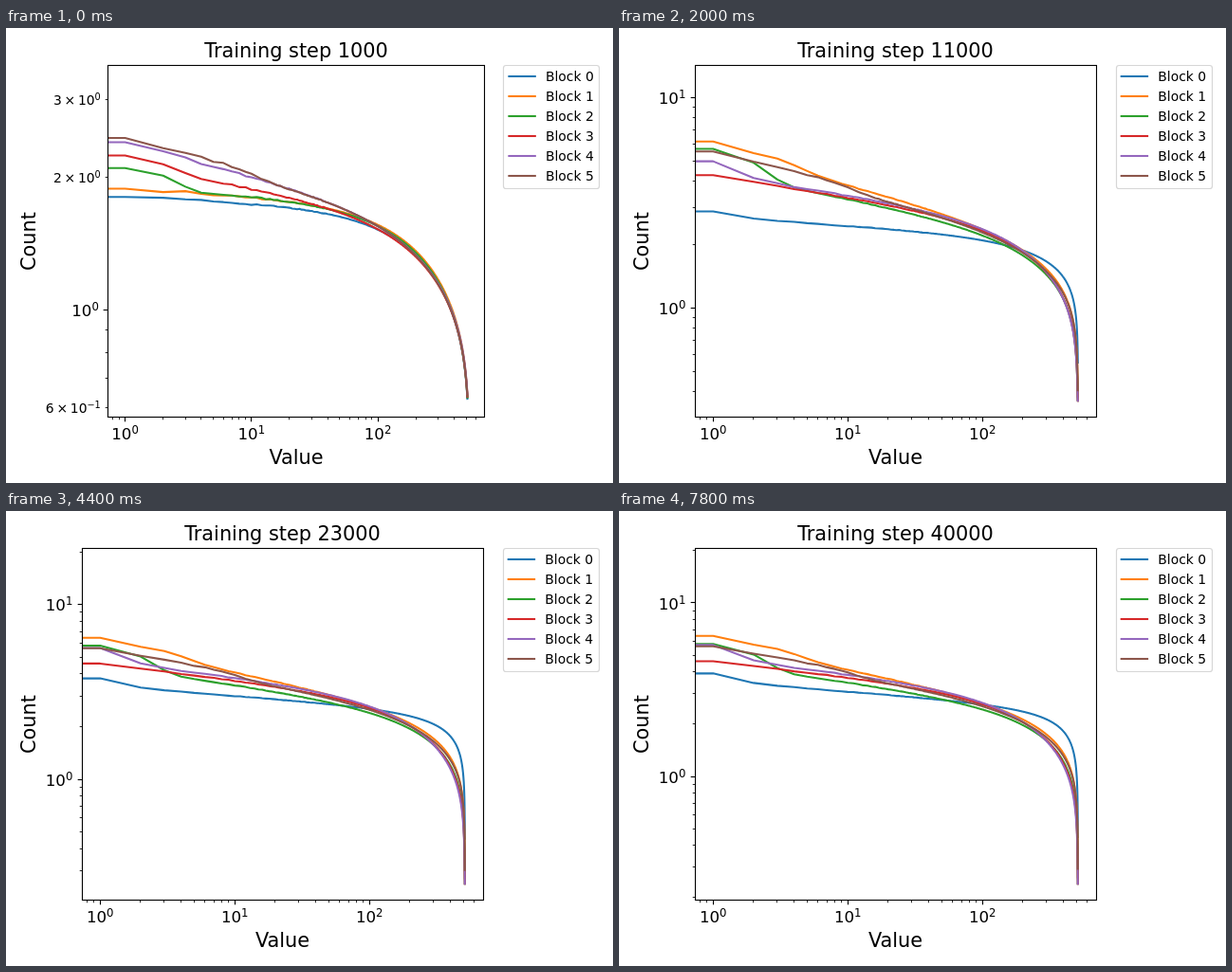
These frames come from a looping animation (640x480 px, 8 s). An HTML page:

```html
<!DOCTYPE html>
<html lang="en">
<head>
<meta charset="utf-8">
<title>Training curves</title>
<style>
html, body { margin: 0; width: 100%; height: 100%; overflow: hidden; background: #fff; }
svg { display: block; width: 640px; height: 480px; font-family: "DejaVu Sans", sans-serif; }
.curve { fill: none; stroke-width: 2.08; stroke-linejoin: round; stroke-linecap: square; }
.major, .frame { fill: none; stroke: #000; stroke-width: 1.11; }
.minor { stroke: #000; stroke-width: .83; }
</style>
</head>
<body>
<svg id="chart" viewBox="0 0 640 480"></svg>
<script>
const STEP_MS = 200, STEPS = 40, COUNT = 511;
const TOP = 39.5, BOTTOM = 410, HEIGHT = BOTTOM - TOP;

// Each curve in log10: level at 1, level at 100, linear fall, edge exponent,
// lift of the largest values. `reach` is how many values are lifted;
// `settle` is the time constant of the head in steps.
const BLOCKS = [
  { color: '#1f77b4', from: [.256, .232, .18, .17, 0], to: [.55, .43, -.04, .25, .05], reach: 1.4, settle: 10.6, slow: true },
  { color: '#ff7f0e', from: [.275, .243, .18, .17, 0], to: [.775, .46, .06, .28, .035], reach: 5, settle: 3 },
  { color: '#2ca02c', from: [.28, .24, .18, .17, .042], to: [.655, .435, .1, .31, .11], reach: 2.4, settle: 2.5 },
  { color: '#d62728', from: [.33, .225, .14, .17, .02], to: [.665, .485, .21, .29, 0], reach: 2.6, settle: 4.5 },
  { color: '#9467bd', from: [.38, .228, .12, .17, 0], to: [.688, .498, .23, .3, .08], reach: 1.4, settle: 5.5 },
  { color: '#8c564b', from: [.375, .23, .13, .17, .015], to: [.72, .45, .11, .25, .03], reach: 11, settle: 2.5 }
];
const BULK_SETTLE = 6.5;

const approach = (a, b, t, tau, power = 1) => b + (a - b) * Math.exp(-((t / tau) ** power));
const noise = n => { const v = Math.sin(n * 127.1) * 43758.5453; return v - Math.floor(v) - .5; };

// Monotone cubic interpolation through a few points.
function spline(xs, ys) {
  const n = xs.length;
  const d = xs.slice(1).map((x, i) => (ys[i + 1] - ys[i]) / (x - xs[i]));
  const m = xs.map((_, i) => {
    const a = d[i - 1], b = d[i];
    return i && i < n - 1 && a * b > 0 ? 2 * a * b / (a + b) : 0;
  });
  m[0] = 1.5 * d[0] - .5 * m[1];
  m[n - 1] = 1.5 * d[n - 2] - .5 * m[n - 2];
  return x => {
    let i = 0;
    while (i < n - 2 && x > xs[i + 1]) i++;
    const h = xs[i + 1] - xs[i], u = (x - xs[i]) / h, v = 1 - u;
    return v * v * ((1 + 2 * u) * ys[i] + u * h * m[i]) +
           u * u * ((3 - 2 * u) * ys[i + 1] - v * h * m[i + 1]);
  };
}

// Vertical limits as log10 values.
const LIMIT_STEPS = [1, 7, 15, 23, 29, 40];
const lowAt = spline(LIMIT_STEPS, [-.243, -.449, -.571, -.688, -.717, -.71]);
const highAt = spline(LIMIT_STEPS, [.554, 1.015, 1.237, 1.32, 1.33, 1.314]);

function curveAt(block, index, step) {
  const t = step - 1;
  const [head, bulk, fall, edge, lift] = block.from.map((a, i) => {
    const tau = block.slow || i === 0 || i === 4 ? block.settle : BULK_SETTLE;
    return approach(a, block.to[i], t, tau, block.slow ? 1.5 : 1);
  });
  const end = COUNT + approach(19, .4, t, 3.9);
  return x => {
    const lx = Math.log10(x);
    const rough = x > 1 ? .01 * noise(x + 600 * index) / Math.sqrt(x) : 0;
    return head + (bulk - head) * lx / 2 - fall * x / COUNT + edge * Math.log10(1 - x / end) +
           lift / (1 + (x / block.reach) ** 6) + rough * (x < 40);
  };
}

const snap = v => Math.floor(v) + .5;
const text = (x, y, size, anchor, body, more = '') =>
  `<text x="${x}" y="${y}" font-size="${size}" text-anchor="${anchor}" ${more}>${body}</text>`;
const line = (kind, x1, y1, x2, y2) =>
  `<line class="${kind}" x1="${x1}" y1="${y1}" x2="${x2}" y2="${y2}"/>`;
const power = (e, size, lead = '') =>
  `${lead}10<tspan dy="${-.383 * size}" font-size="${.7 * size}">${String(e).replace('-', '\u2212')}</tspan>`;

function axes(low, high, left, right, px, py, narrow) {
  const base = snap(BOTTOM), edge = snap(left);
  let out = '';
  for (let e = -1; e <= 2; e++) {
    for (let k = 1; k < 10; k++) {
      const lg = e + Math.log10(k), major = k === 1;
      const kind = major ? 'major' : 'minor', size = major ? 4.86 : 2.78;
      const x = px(lg), y = py(lg);
      if (x > left && x < right) {
        out += line(kind, snap(x), base, snap(x), base + size);
        if (major) out += text(x, 434, 16.67, 'middle', power(e, 16.67));
      }
      if (lg > low && lg < high) {
        out += line(kind, edge, snap(y), edge - size, snap(y));
        if (major) out += text(left - 9.7, Math.round(y + 6.7), 16.67, 'end', power(e, 16.67));
        else if (narrow && [2, 3, 4, 6].includes(k))
          out += text(left - 7.7, Math.round(y + 5.6), 13.89, 'end', power(e, 13.89, `${k}\u2009×\u2009`));
      }
    }
  }
  return out + `<rect class="frame" x="${edge}" y="${TOP}" width="${snap(right) - edge}" height="${base - TOP}"/>`;
}

function legend(x) {
  let out = '<rect x="524.5" y="39.5" width="101" height="130" rx="2.8" fill="#fff" stroke="#d6d6d6" stroke-width="1.2"/>';
  BLOCKS.forEach(({ color }, i) => {
    const y = 51 + 21 * i;
    out += `<path class="curve" stroke="${color}" d="M${x} ${y}h27.4"/>`;
    out += text(x + 38.6, y + 5, 13.89, 'start', `Block ${i}`);
  });
  return out;
}

function render(step) {
  const low = lowAt(step), high = highAt(step);
  // Ranges under one decade get wide minor labels, which push the axis right.
  const narrow = high - low < 1;
  const left = narrow ? 107.5 : 80, right = narrow ? 504.5 : 503;
  const margin = (right - left) / 22;
  const unit = (right - left - 2 * margin) / Math.log10(COUNT);
  const px = lx => left + margin + unit * lx;
  const py = ly => BOTTOM - (ly - low) / (high - low) * HEIGHT;
  const floor = low + (high - low) / 22, middle = (left + right) / 2;

  let out = `<clipPath id="area"><rect x="${left}" y="${TOP}" width="${right - left}" height="${HEIGHT}"/></clipPath>`;
  out += '<g clip-path="url(#area)">';
  BLOCKS.forEach((block, index) => {
    const curve = curveAt(block, index, step);
    let d = `M${left - 5} ${py(curve(1)).toFixed(2)}`;
    for (let x = 1; x <= COUNT; x++)
      d += `L${px(Math.log10(x)).toFixed(2)} ${py(Math.max(floor, curve(x))).toFixed(2)}`;
    out += `<path class="curve" stroke="${block.color}" d="${d}"/>`;
  });
  out += '</g>' + axes(low, high, left, right, px, py, narrow);
  out += text(middle, 31, 20.83, 'middle', `Training step ${step * 1000}`);
  out += text(middle, 460, 20.83, 'middle', 'Value');
  out += text(0, 0, 20.83, 'middle', 'Count', 'transform="translate(31 225) rotate(-90)"');
  return out + legend(narrow ? 530.4 : 529.7);
}

const chart = document.getElementById('chart');
let shown = 0;
function tick() {
  const step = Math.floor(performance.now() / STEP_MS) % STEPS + 1;
  if (step !== shown) chart.innerHTML = render(shown = step);
  requestAnimationFrame(tick);
}
tick();
</script>
</body>
</html>
```
